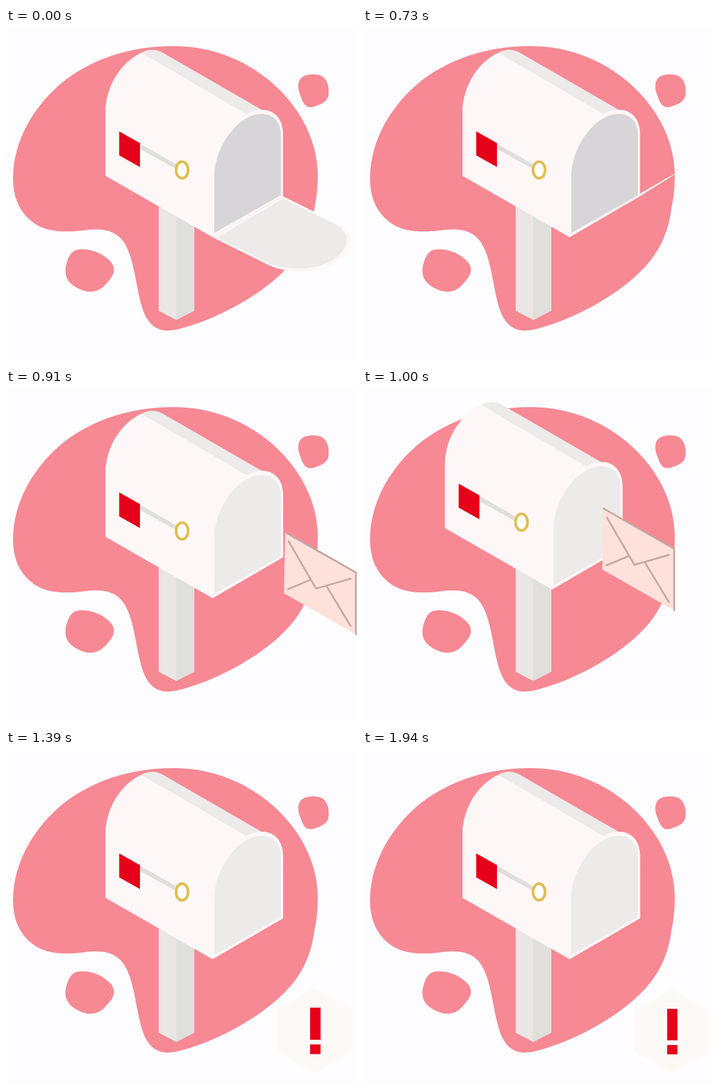
These frames come from a looping animation (600 px wide and 570 px high, 2 s). An HTML page with a canvas:

```html
<!DOCTYPE html>
<html lang="en">
<head>
<meta charset="utf-8">
<title>Mailbox</title>
<style>
  html, body { margin: 0; width: 100%; height: 100%; overflow: hidden; background: #fdfcfe; }
  canvas { display: block; }
</style>
</head>
<body>
<canvas id="stage" width="600" height="570"></canvas>
<script>
const ctx = document.getElementById('stage').getContext('2d');
const LOOP = 2000;
const PINK = '#f68994', CREAM = '#fdf7f7', PALE = '#ecebe9', GREY = '#dfdfdb', RED = '#e60019';

const shapes = [
  [`M290,31 C424,32 532,140 533,250 C533,280 530,295 527,311 C520,360 500,390 480,411
    C441,453 375,490 320,508 C302,514 288,518 275,518 C248,517 236,495 229,465
    C220,425 217,390 201,366 C186,344 160,343 135,346 C100,351 65,349 44,331
    C20,312 12,285 12,256 C13,190 50,130 100,90 C150,52 215,30 290,31Z`, PINK],
  [`M120,380 C140,375 165,385 178,399 C190,413 184,424 172,437 C158,454 140,455 122,445
    C105,436 100,424 102,410 C104,400 108,384 120,380Z`, PINK],
  [`M508,83 C517,78 533,78 541,83 C551,90 553,105 551,116 C549,127 537,131 525,135
    C513,138 508,130 503,115 C498,102 498,89 508,83Z`, PINK],
  ['M261,290 H291.5 V500 L261,484Z', '#e9e6e3'],
  ['M291,290 H322 V484 L291,500Z', GREY]
];
const body = 'M170,253 V139 C172,100 195,59 232,42 L412,147 L440,200 L353,358Z';
const roof = 'M232,42 C245,35 259,36 271,44 L444,144 L412,148Z';
const rim = 'M353,358 V250 C353,203 386,157 412,147 C420,142 430,140 438,140 C460,140 473.5,157 473.5,181 V288Z';
const inner = 'M356,351 V254 C356,205 396,147 437,147 C457,147 470,161 470,183 V286Z';
const arm = 'M229,198 L292,234 V242 L229,207Z';
const flag = 'M193.5,177 L229,197 V238 L193.5,218Z';
const paper = 'M411,204 L532,273 V379 L409,309Z';
const paperEdge = 'M411,204.5 L532,273.5 V379';
const folds = 'M417,220 L464,301 L523,284 M416,302 L454,286 M482,297 L523,365';
const hexagon = 'M527.5,410 L590,446 V517 L527.5,553 L464,517 V446Z';
const mark = 'M520,443 H537.5 V497 H520Z M520,505 H537.5 V521 H520Z';

const clamp = (t, a, b) => Math.min(1, Math.max(0, (t - a) / (b - a)));
const inOut = p => (1 - Math.cos(Math.PI * p)) / 2;

function fill(path, color) {
  ctx.fillStyle = color;
  ctx.fill(new Path2D(path));
}

function line(path, color, width) {
  ctx.strokeStyle = color;
  ctx.lineWidth = width;
  ctx.stroke(new Path2D(path));
}

// Runs draw in its own saved canvas state.
function group(draw) {
  ctx.save();
  draw();
  ctx.restore();
}

// Swings the front panel around its bottom edge; open runs from 0 (shut) to 1 (flat).
function drawDoor(open) {
  const slope = 0.581, base = 563.1;
  const wx = 0.865 * open, wy = 0.43 * open - 1 + open ** 1.6;
  group(() => {
    ctx.transform(1 - slope * wx, -slope * (1 + wy), -wx, -wy, base * wx, base * (1 + wy));
    fill(rim, CREAM);
    fill(inner, PALE);
  });
}

function drawBox(push, open) {
  group(() => {
    ctx.translate(-push, -push / 2);
    fill(body, CREAM);
    fill(roof, PALE);
    fill(rim, CREAM);
    fill(inner, '#d7d5d8');
    drawDoor(open);
    fill(arm, GREY);
    fill(flag, RED);
    ctx.beginPath();
    ctx.ellipse(301, 243, 10.3, 14.3, 0, 0, 7);
    ctx.fillStyle = '#fffdfd';
    ctx.fill();
    ctx.strokeStyle = '#dfbf52';
    ctx.lineWidth = 4.6;
    ctx.stroke();
  });
}

function drawLetter(t, ahead) {
  const drop = t > 1000 ? 21 * ((t - 1000) / 120) ** 2 : 0;
  group(() => {
    ctx.globalAlpha = 1 - clamp(t, 1030, 1210);
    ctx.translate(ahead, ahead * 0.615 + drop);
    fill(paper, '#fde1da');
    ctx.lineCap = ctx.lineJoin = 'round';
    line(paperEdge, '#c2a7a2', 3);
    line(folds, '#c2a7a2', 3);
  });
}

function drawBadge(t) {
  const rise = Math.sin(clamp(t, 1062, 1240) * Math.PI / 2);
  const size = rise * (1 + 0.1 * (1 - clamp(t, 1240, 1600)) ** 3);
  if (!size) return;
  group(() => {
    ctx.translate(528.5, 551);
    ctx.scale(size, size);
    ctx.translate(-528.5, -551);
    fill(hexagon, '#fdf9f6');
    fill(mark, RED);
  });
}

function draw(now) {
  const t = now % LOOP;
  const ahead = Math.max(0, (1000 - t) * 156 / 210);
  const push = Math.max(0, 30 - ahead) * (1 - inOut(clamp(t, 1000, 1170)));
  ctx.fillStyle = '#fdfcfe';
  ctx.fillRect(0, 0, 600, 570);
  for (const [path, color] of shapes) fill(path, color);
  drawBox(push, 1 - inOut(clamp(t, 580, 920)));
  drawLetter(t, ahead);
  drawBadge(t);
}

const start = performance.now();
function tick() {
  draw(performance.now() - start);
  requestAnimationFrame(tick);
}
tick();
</script>
</body>
</html>
```
